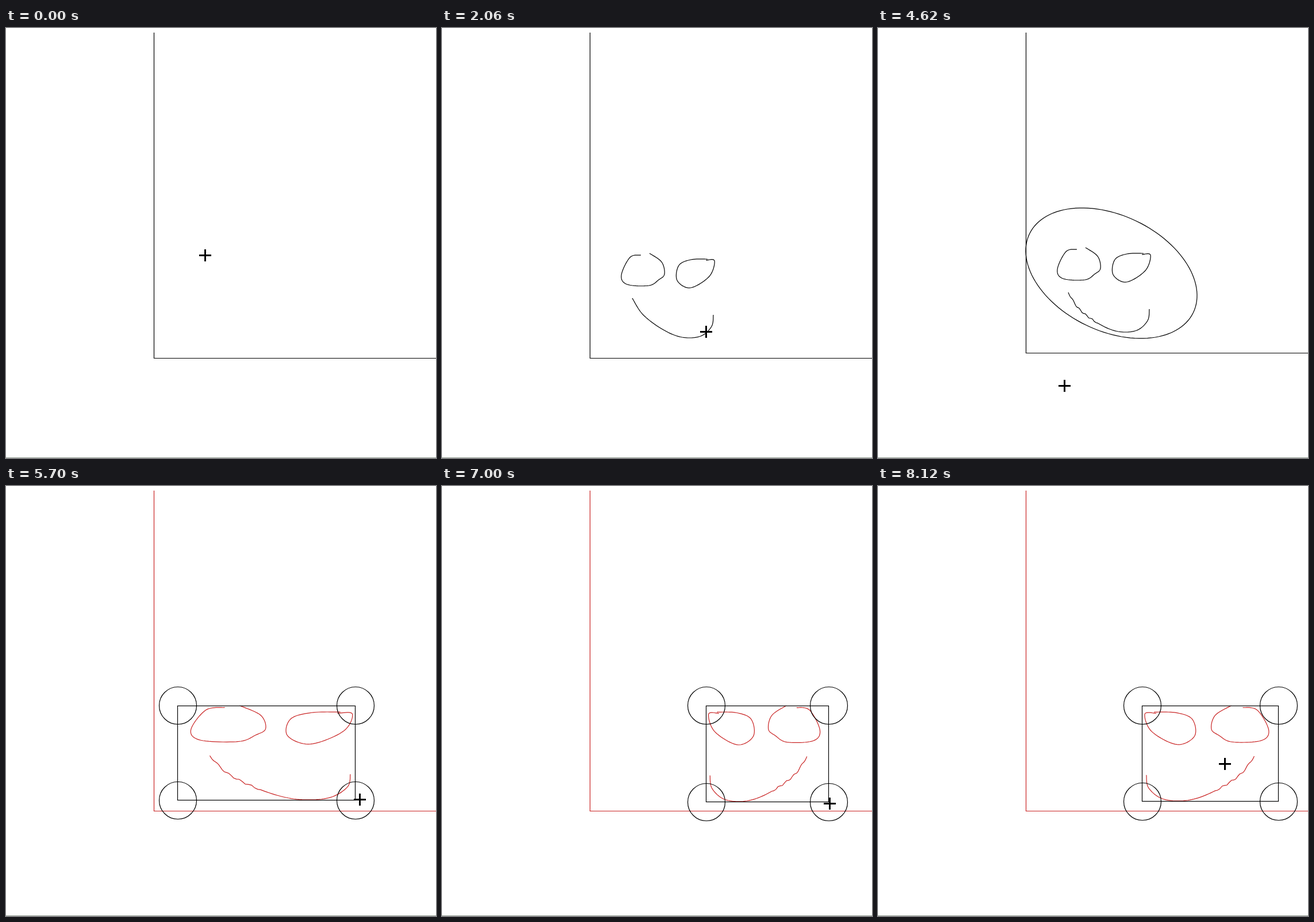
Write an HTML page with a canvas that moves like this. It is 748x748 px and loops after 8220 ms.

```html
<!DOCTYPE html>
<html lang="en">
<head>
<meta charset="utf-8">
<title>Sketch and resize</title>
<style>
  html, body { margin: 0; width: 100%; height: 100%; overflow: hidden; background: #fff; }
  canvas { display: block; }
</style>
</head>
<body>
<canvas id="stage" width="748" height="748"></canvas>
<script>
const ctx = document.getElementById('stage').getContext('2d');
const { PI, sin, cos, min, max, round } = Math;
const SIZE = 748, LOOP = 8220, RED = '#c92424', INK = '#000';
const TOP = 382, BOX = { left: 299, right: 477, bottom: 530 };

const clamp = (v, lo = 0, hi = 1) => min(hi, max(lo, v));
const progress = (t, start, end) => clamp((t - start) / (end - start));
const smooth = u => u * u * (3 - 2 * u);

// Smooth hand-drawn line through a few key points.
function curve(...p) {
  const steps = 12, out = [];
  for (let i = 0; i < p.length - 1; i++) {
    const a = p[i - 1] || p[i], b = p[i], c = p[i + 1], d = p[i + 2] || c;
    for (let k = 0; k < steps; k++) {
      const u = k / steps;
      out.push([0, 1].map(n => b[n] + u / 2 * (c[n] - a[n] +
        u * (2 * a[n] - 5 * b[n] + 4 * c[n] - d[n] + u * (3 * (b[n] - c[n]) + d[n] - a[n])))));
    }
  }
  return [...out, p[p.length - 1]];
}

const leftEye = curve([346, 395], [327, 399], [312, 430], [322, 446], [360, 448],
  [377, 438], [387, 428], [382, 407], [361, 392]);
const rightEye = curve([462, 402], [433, 403], [412, 413], [409, 439], [432, 452],
  [465, 432], [474, 405], [459, 404]);
const mouth = curve([331, 470], [350, 499], [385, 525], [418, 538], [450, 536], [469, 519], [472, 499]);
const outline = Array.from({ length: 121 }, (_, i) => {
  const angle = 1.243 - i / 120 * 2 * PI;
  return [406 + 149 * cos(angle), 426.5 + 113.5 * sin(angle + 0.35)];
});

// The pen's timeline: each action starts where the previous one stopped.
const actions = [];
let last = [345, 395];
function go(start, end, x, y, swing = [0, 0]) {
  const from = last;
  actions.push({ start, at(t) {
    const u = progress(t, start, end), e = smooth(u);
    return [from[0] + (x - from[0]) * e + swing[0] * sin(2 * PI * u),
            from[1] + (y - from[1]) * e + swing[1] * sin(PI * u)];
  } });
  last = [x, y];
}
function trace(start, end, points) {
  const drawn = t => points.slice(0, round(progress(t, start, end) * (points.length - 1)) + 1);
  actions.push({ start, at: t => drawn(t).pop() });
  last = points[points.length - 1];
  return { start, drawn };
}

const leftStroke = trace(100, 660, leftEye);
go(660, 840, ...rightEye[0]);
const rightStroke = trace(940, 1330, rightEye);
go(1330, 1410, ...mouth[0]);
const mouthStroke = trace(1410, 1680, mouth);
go(1780, 2060, 459, 528);
go(2060, 2500, 470, 629);
go(2640, 3440, ...outline[0]);
const outlineStroke = trace(3440, 4300, outline);
go(4320, 4720, 300, 637);
go(4720, 5140, 502, 613);
go(5160, 5280, 375, 392);
go(5440, 5540, 484, 528);
go(5540, 5700, 613, 545);
go(5700, 6180, 484, 547, [130, 10]);
go(6180, 6400, 300, 551);
go(6400, 6440, 310, 551);
go(6540, 7000, 674, 552, [-190, 165]);
go(7100, 7480, 241, 715);
go(7480, 7860, 698, 551);
go(7960, 8060, 458, 410);
go(8060, 8120, 603, 483);

const pen = t => (actions.findLast(a => a.start <= t) || actions[0]).at(t);

function selection(t) {
  let { left, right, bottom } = BOX;
  if (t >= 5540) {
    const [x, y] = pen(min(t, 6170));
    [right, bottom] = [x - 7, y + 2];
  }
  if (t >= 6400) {
    const [x, y] = pen(min(t, 7900));
    [left, bottom] = [x - 1, y - 2];
  }
  return { left, right, bottom };
}

function polyline(points, color) {
  ctx.strokeStyle = color;
  ctx.beginPath();
  for (const p of points) ctx.lineTo(...p);
  ctx.stroke();
}

function drawHandles({ left, right, bottom }) {
  const [l, r, b] = [left, right, bottom].map(round);
  ctx.strokeStyle = INK;
  ctx.strokeRect(l - 0.5, TOP + 0.5, r - l, b - TOP - 1);
  for (const x of [l, r]) for (const y of [TOP, b]) {
    ctx.beginPath();
    ctx.arc(x, y, 32.5, 0, 2 * PI);
    ctx.stroke();
  }
}

function render(t) {
  const color = t >= 4800 ? RED : INK;
  const lift = smooth(progress(t, 2400, 2900));
  const box = selection(t);
  const scaleX = (box.right - box.left) / (BOX.right - BOX.left);
  const scaleY = (box.bottom - TOP) / (BOX.bottom - TOP);
  const place = ([x, y]) =>
    [box.left + (x - BOX.left) * scaleX, TOP + (y - 10 * lift - TOP) * scaleY];
  // Once lifted, the left part of the mouth shows small bumps.
  const ripple = ([x, y]) => [x, y + (x < 382 ? 1.5 * lift * sin((x - 331) / 11 * 2 * PI) : 0)];

  ctx.fillStyle = '#fff';
  ctx.fillRect(0, 0, SIZE, SIZE);
  ctx.fillStyle = '#8f9b8f';
  ctx.fillRect(0, SIZE - 1, SIZE, 1);
  ctx.lineWidth = 1.2;

  const floor = round(574 - 9 * lift) + 0.5;
  polyline([[257.5, 8], [257.5, floor], [SIZE, floor]], color);
  for (const s of [leftStroke, rightStroke])
    if (t >= s.start) polyline(s.drawn(t).map(place), color);
  if (t >= mouthStroke.start) polyline(mouthStroke.drawn(t).map(ripple).map(place), color);
  if (t >= outlineStroke.start && t < 4760) polyline(outlineStroke.drawn(t), color);
  if (t >= 5440) drawHandles(box);

  const [x, y] = pen(t).map(round);
  ctx.fillStyle = INK;
  ctx.fillRect(x - 10, y - 1, 21, 3);
  ctx.fillRect(x - 1, y - 10, 3, 21);
}

const begin = performance.now();
function tick() {
  render((performance.now() - begin) % LOOP);
  requestAnimationFrame(tick);
}
tick();
</script>
</body>
</html>
```
